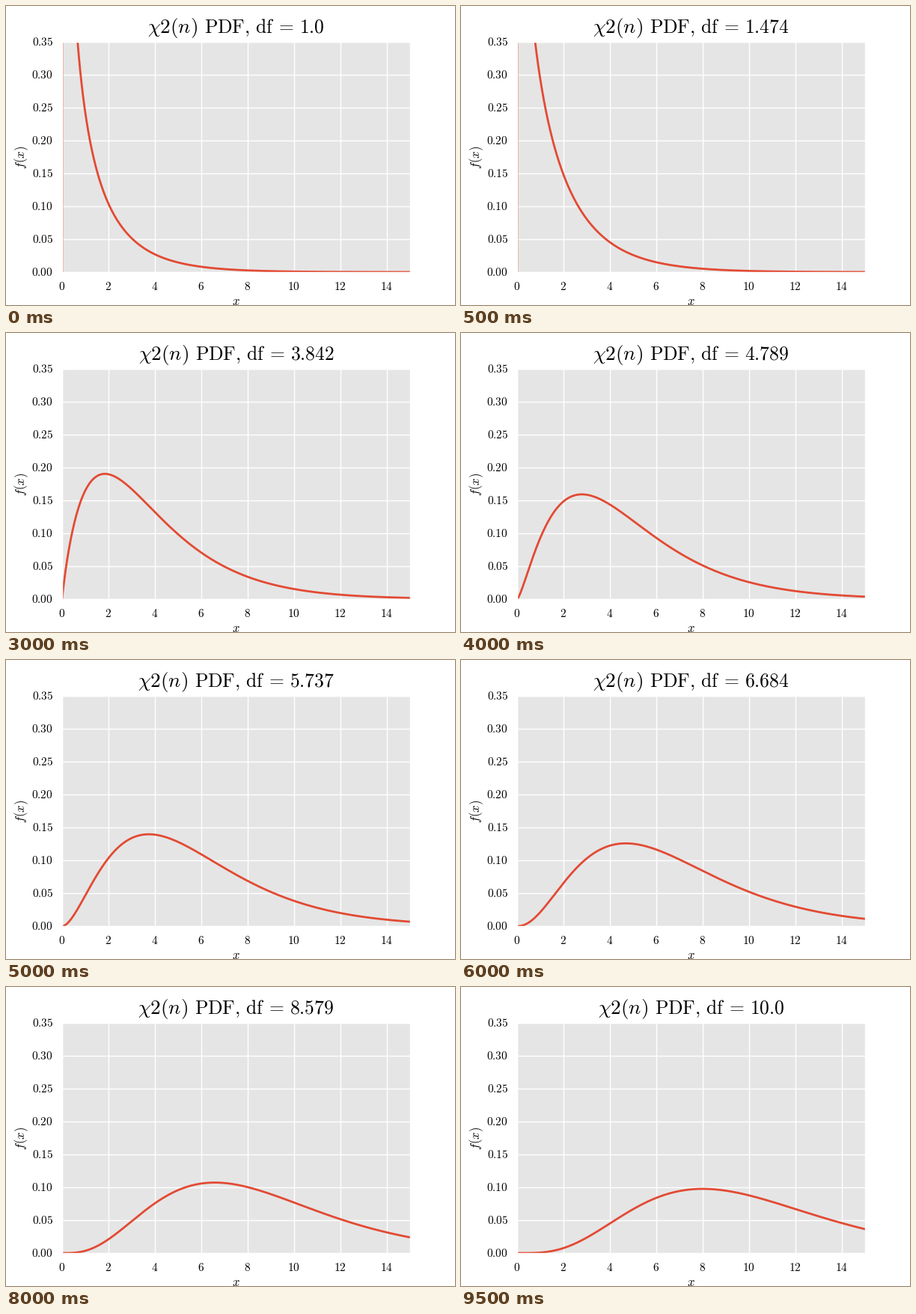
Write a matplotlib script that moves like this. It is 600 px wide and 400 px high and loops after 10000 ms.

```python
import math

import matplotlib.pyplot as plt
import numpy as np
from matplotlib.animation import FuncAnimation

WIDTH, HEIGHT, DPI = 600, 400, 100
FRAMES, INTERVAL = 20, 500
CENTER = 307.5
TITLE_GAP = 9

plt.rcParams["mathtext.fontset"] = "cm"

fig = plt.figure(figsize=(WIDTH / DPI, HEIGHT / DPI), dpi=DPI, facecolor="white")
ax = fig.add_axes([0.125, 0.11, 0.775, 0.77], facecolor="#E5E5E5")
ax.set(xlim=(0, 15), ylim=(0, 0.35))
ax.set_xticks(range(0, 15, 2))
ax.set_yticks(np.arange(8) * 0.05)
ax.tick_params(length=0, labelbottom=False, labelleft=False)
ax.set_axisbelow(True)
ax.grid(color="white", linestyle="-", linewidth=1)
for spine in ax.spines.values():
    spine.set(edgecolor="white", linewidth=1)


def label(x, y, text, size, ha="center", va="baseline", **kwargs):
    """Place math text at pixel coordinates measured from the top left."""
    return fig.text(x / WIDTH, 1 - y / HEIGHT, f"${text}$", fontsize=size,
                    color="black", ha=ha, va=va, **kwargs)


for value in range(0, 15, 2):
    label(74.7 + 31 * value, 380, value, 11)
for i in range(8):
    label(63, 361 - 44 * i, f"{0.05 * i:.2f}", 11, ha="right")
label(CENTER, 400, "x", 12)
label(20.7, 202, "f(x)", 12, va="center", rotation=90)

symbol = label(0, 36, r"\chi2(n)", 19.5, ha="left")
caption = label(0, 36, "", 18.4, ha="left")

x = np.linspace(0, 15, 1000)
curve, = ax.plot([], [], color="#E24A33", linewidth=2)


def chi2_pdf(x, df):
    """Chi-squared density, taken as zero at the origin."""
    pdf = np.zeros_like(x)
    pos = x > 0
    norm = 2 ** (df / 2) * math.gamma(df / 2)
    pdf[pos] = x[pos] ** (df / 2 - 1) * np.exp(-x[pos] / 2) / norm
    return pdf


def update(frame):
    df = 1 + 9 * frame / (FRAMES - 1)
    curve.set_data(x, chi2_pdf(x, df))
    caption.set_text(rf"$\mathrm{{PDF,\,df}}\,=\,{round(df, 3)}$")
    offset = symbol.get_window_extent().width + TITLE_GAP
    left = CENTER - (offset + caption.get_window_extent().width) / 2
    symbol.set_x(left / WIDTH)
    caption.set_x((left + offset) / WIDTH)
    return curve, symbol, caption


anim = FuncAnimation(fig, update, frames=FRAMES, interval=INTERVAL,
                     repeat=True, repeat_delay=0)
plt.show()
```
